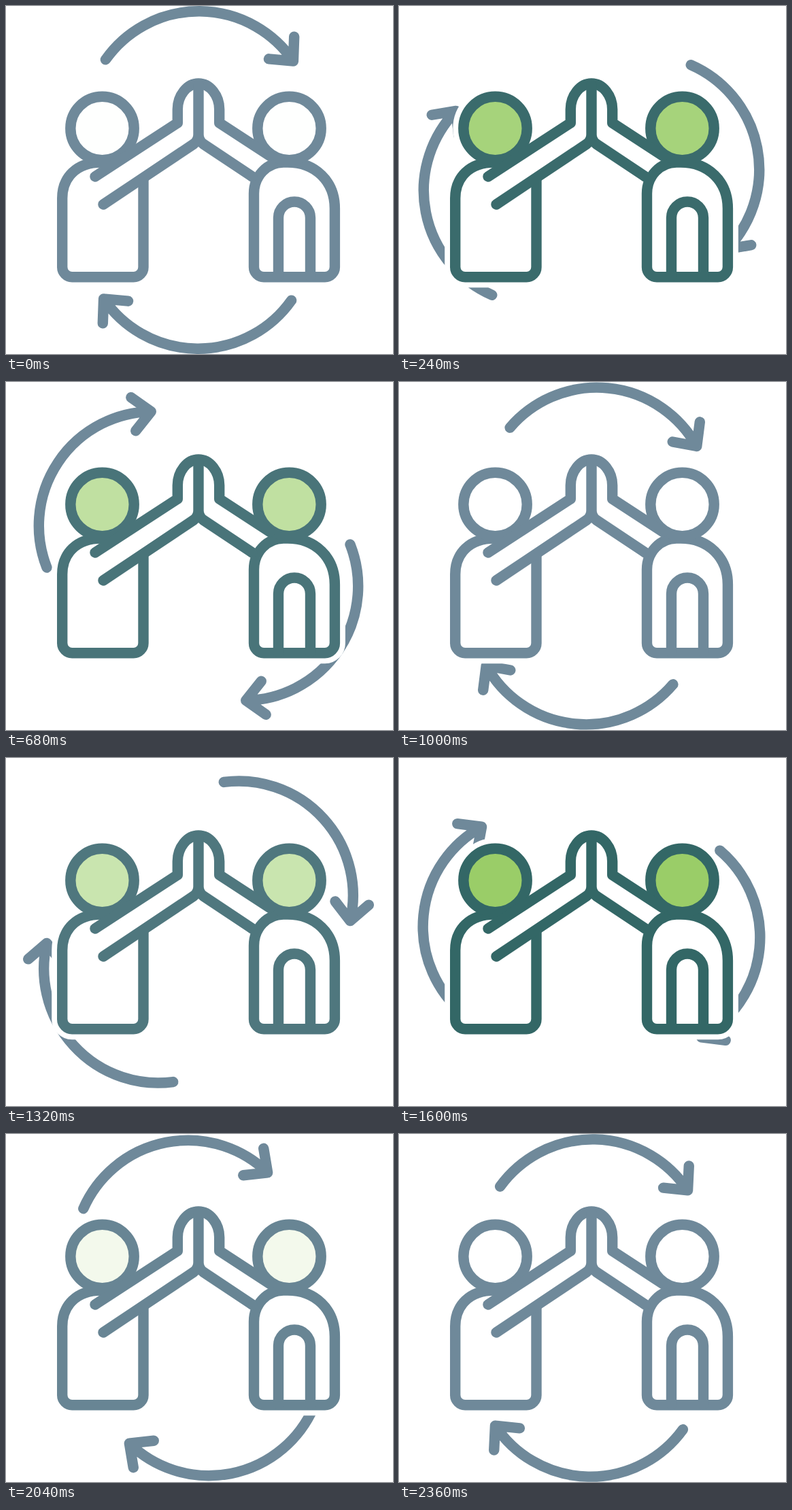
An HTML page for the animation above (2400 ms loop, 569 by 512 pixels).

```html
<!DOCTYPE html>
<html lang="en">
<head>
<meta charset="utf-8">
<title>High five</title>
<style>
  html, body { margin: 0; width: 100%; height: 100%; overflow: hidden; background: #fff; }
  svg { display: block; width: 569px; height: 512px; }
  .line { fill: none; stroke-width: 15.4; stroke-linecap: round; stroke-linejoin: round; }
  .halo { fill: #fff; stroke: #fff; stroke-width: 31; stroke-linejoin: round; }
</style>
</head>
<body>
<svg viewBox="0 0 569 512">
  <defs>
    <g id="arrow">
      <path d="M145 80A168 168 0 0 1 421 80M385 77L421 80L422 44"/>
    </g>
    <path id="bodyL" d="M140 230C104 230 82.7 252 82.7 283V384a14.5 14.5 0 0 0 14.5 14.7H187.5a14.5 14.5 0 0 0 14.5 -14.7V254"/>
    <path id="bodyR" d="M364.5 276C364.5 250 384 230 408 230H414C455 230 483.4 258 483.4 298V384a14.5 14.5 0 0 1 -14.5 14.7H379a14.5 14.5 0 0 1 -14.5 -14.7Z"/>
    <circle id="headL" cx="141.5" cy="180" r="46.7"/>
    <circle id="headR" cx="416.5" cy="180" r="46.7"/>
  </defs>

  <g id="arrows" class="line" stroke="#6f899a">
    <use href="#arrow"/>
    <use href="#arrow" transform="rotate(180 283 256)"/>
  </g>

  <g class="halo">
    <use href="#bodyL"/><use href="#bodyR"/>
    <use href="#headL"/><use href="#headR"/>
  </g>

  <g id="people" class="line">
    <use href="#bodyL"/><use href="#bodyR"/>
    <g id="heads"><use href="#headL"/><use href="#headR"/></g>
    <path d="M131 251L252.3 172V152C252.3 132 266 114 283 114S313.7 132 313.7 152V172L388 220.500"/>
    <path d="M143 292L276 203Q283 198 283 189V116M283 189Q283 198 290 203L362 251"/>
    <path d="M400.500 398V311.500a23.500 23.500 0 0 1 47 0V398"/>
  </g>
</svg>
<script>
  const LOOP = 2400, TURN = 600;
  const GREY = [111, 137, 154], TEAL = [51, 103, 102];
  const WHITE = [255, 255, 255], GREEN = [154, 205, 104];
  const [arrows, people, heads] = ['arrows', 'people', 'heads'].map(id => document.getElementById(id));

  // Fast start, slight overshoot, then settle at 1.
  function ease(p) {
    const peak = 0.692, top = 1.0644;
    if (p < peak) return top * (1 - (1 - p / peak) ** 2);
    const v = (p - peak) / (1 - peak);
    return top - 0.151 * v * v + 0.0866 * v ** 3;
  }

  const mix = (a, b, k) => `rgb(${a.map((c, i) => Math.round(c + (b[i] - c) * k))})`;

  function draw(ms) {
    const t = ms % LOOP;
    const turn = Math.floor(t / TURN);
    const e = ease((t % TURN) / TURN);
    const shade = Math.min(1, e);
    const k = turn % 2 ? 1 - shade : shade;
    arrows.setAttribute('transform', `rotate(${90 * (turn + e)} 283 256)`);
    people.setAttribute('stroke', mix(GREY, TEAL, k));
    heads.setAttribute('fill', mix(WHITE, GREEN, k));
  }

  const start = performance.now();
  function tick() {
    draw(performance.now() - start);
    requestAnimationFrame(tick);
  }
  draw(0);
  requestAnimationFrame(tick);
</script>
</body>
</html>
```
